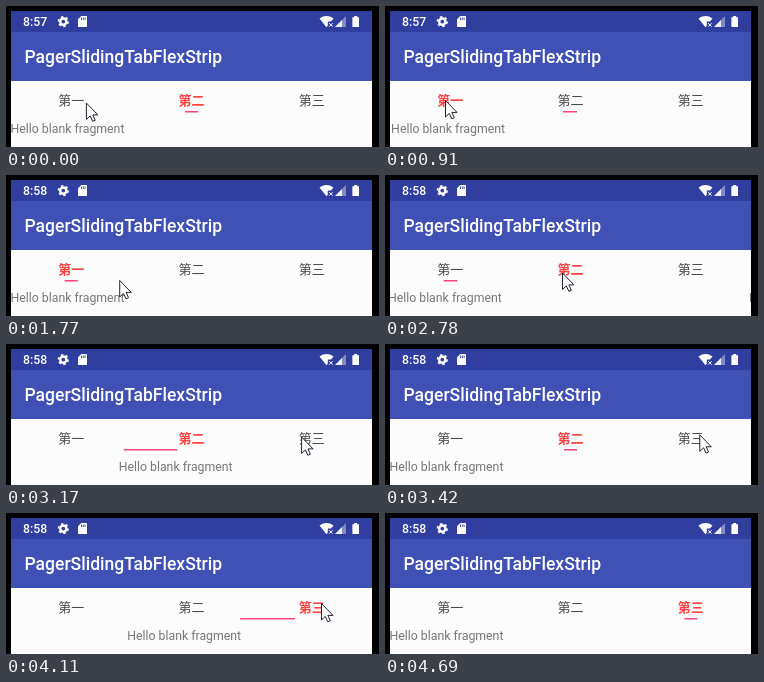
Write an HTML page that moves like this. It is 373x141 px and loops after 6.06 s.

```html
<!DOCTYPE html>
<html lang="en">
<head>
<meta charset="utf-8">
<style>
  html, body { margin: 0; width: 100%; height: 100%; overflow: hidden; background: #000; }
  svg { display: block; width: 373px; height: 141px; }
  text { font-family: Roboto, sans-serif; }
  .tab { font: 13px "Noto Sans CJK SC", "Noto Sans CJK", sans-serif; text-anchor: middle; fill: #4c4c4c; }
  .tab.on { fill: #ff4444; font-weight: 700; }
  .page { font-size: 12.3px; fill: #777; }
</style>
</head>
<body>
<svg viewBox="0 0 373 141">
  <defs>
    <clipPath id="screen"><rect x="5" y="5" width="361" height="136"/></clipPath>
  </defs>
  <g clip-path="url(#screen)">
    <rect x="5" y="5" width="361" height="136" fill="#fcfcfc"/>
    <rect x="5" y="5" width="361" height="21" fill="#303f9f"/>
    <rect x="5" y="26" width="361" height="49" fill="#3f51b5"/>
    <text id="clock" x="17" y="20" font-size="12.3" font-weight="500" fill="#fff"></text>
    <text x="18.5" y="57" font-size="17.55" font-weight="500" fill="#fff">PagerSlidingTabFlexStrip</text>

    <!-- status icons -->
    <g fill="none" stroke="#fff">
      <circle cx="57.3" cy="15.6" r="3.1" stroke-width="2.4"/>
      <circle cx="57.3" cy="15.6" r="4.8" stroke-width="1.6" pathLength="12" stroke-dasharray="1"/>
    </g>
    <path d="M75.3 10H80.5Q81 10 81 10.6V20.4Q81 21 80.4 21H72.6Q72 21 72 20.4V13.3Z" fill="#fff"/>
    <path d="M75.5 11.5V14M77.3 11.5V14M79.1 11.5V14" stroke="#303f9f" stroke-width=".9"/>
    <path d="M313.5 12.4Q320.5 7.6 327.5 12.4L325 15.6H321.8V19.6L320.5 21.2Z" fill="#fff"/>
    <path d="M323.2 17.2L326.6 20.6M326.6 17.2L323.2 20.6" stroke="#fff"/>
    <path d="M340 10V21H329Z" fill="#fff" opacity=".4"/>
    <path d="M336 14V21H329Z" fill="#fff" opacity=".85"/>
    <path d="M348.2 10H351.2V11.2H353V21H346.4V11.2H348.2Z" fill="#fff"/>

    <g id="tabs"></g>
    <rect id="indicator" y="105" height="1.5" fill="#ff4081"/>
    <g id="pages"></g>
  </g>
  <path id="cursor" d="M.5 .5V17L4.3 13.4 6.8 18.8 9.3 17.7 6.9 12.4H12Z" fill="#fff" stroke="#223"/>
</svg>
<script>
const LOOP = 6060, LEFT = 5, WIDTH = 361, TAB = WIDTH / 3;
const SCROLL = 635, LEAD = 35, CLOCK_TICK = 1200;
const scrolls = [
  { at: 910, from: 1, to: 0 },
  { at: 2780, from: 0, to: 1 },
  { at: 3730, from: 1, to: 2 }
];
// time, x, y of the pointer tip
const pointer = [
  [0, 80, 96.5], [30, 77, 96.5], [140, 61, 94], [319, 61, 94], [320, 60, 94],
  [1400, 60, 94], [1500, 64, 98], [1770, 113, 105], [2070, 177, 97.5],
  [2860, 177, 97.5], [3170, 295, 92.5], [3370, 313, 91], [3450, 315, 90],
  [4360, 315, 90], [4690, 306, 142]
];

const $ = id => document.getElementById(id);
const labels = ["第一", "第二", "第三"];
$("tabs").innerHTML = labels.map((label, i) =>
  `<text class="tab" x="${LEFT + TAB * (i + .5)}" y="98.6">${label}</text>`).join("");
$("pages").innerHTML = labels.map((_, i) =>
  `<text class="page" x="${LEFT - .5 + WIDTH * i}" y="126.5">Hello blank fragment</text>`).join("");

const clamp = v => Math.min(1, Math.max(0, v));
const mix = (a, b, k) => a + (b - a) * k;

function ease(v) {
  const k = clamp(v) ** 1.13;
  return k * k * (3 - 2 * k);
}

function pointerAt(t) {
  const i = pointer.findIndex(p => p[0] > t);
  if (i < 0) return pointer.at(-1).slice(1);
  const [a, b] = [pointer[i - 1], pointer[i]];
  const k = (t - a[0]) / (b[0] - a[0]);
  return [mix(a[1], b[1], k), mix(a[2], b[2], k)];
}

function draw(now) {
  const t = now % LOOP;
  let position = 1, selected = 1;
  for (const { at, from, to } of scrolls) {
    if (t < at) break;
    position = mix(from, to, ease((t - at + LEAD) / SCROLL));
    selected = to;
  }

  // the right edge runs ahead, the left edge catches up
  const page = Math.floor(position), part = position - page;
  const center = LEFT + TAB * (page + .5);
  const x1 = center - 6.5 + TAB * part ** 2;
  const x2 = center + 6.5 + TAB * part * (1 + .87 * part * (1 - part));
  $("indicator").setAttribute("x", x1);
  $("indicator").setAttribute("width", x2 - x1);

  $("pages").setAttribute("transform", `translate(${-position * WIDTH})`);
  [...$("tabs").children].forEach((tab, i) => tab.classList.toggle("on", i === selected));
  $("clock").textContent = t < CLOCK_TICK ? "8:57" : "8:58";
  $("cursor").setAttribute("transform", `translate(${pointerAt(t)})`);
  requestAnimationFrame(draw);
}
draw(0);
</script>
</body>
</html>
```
